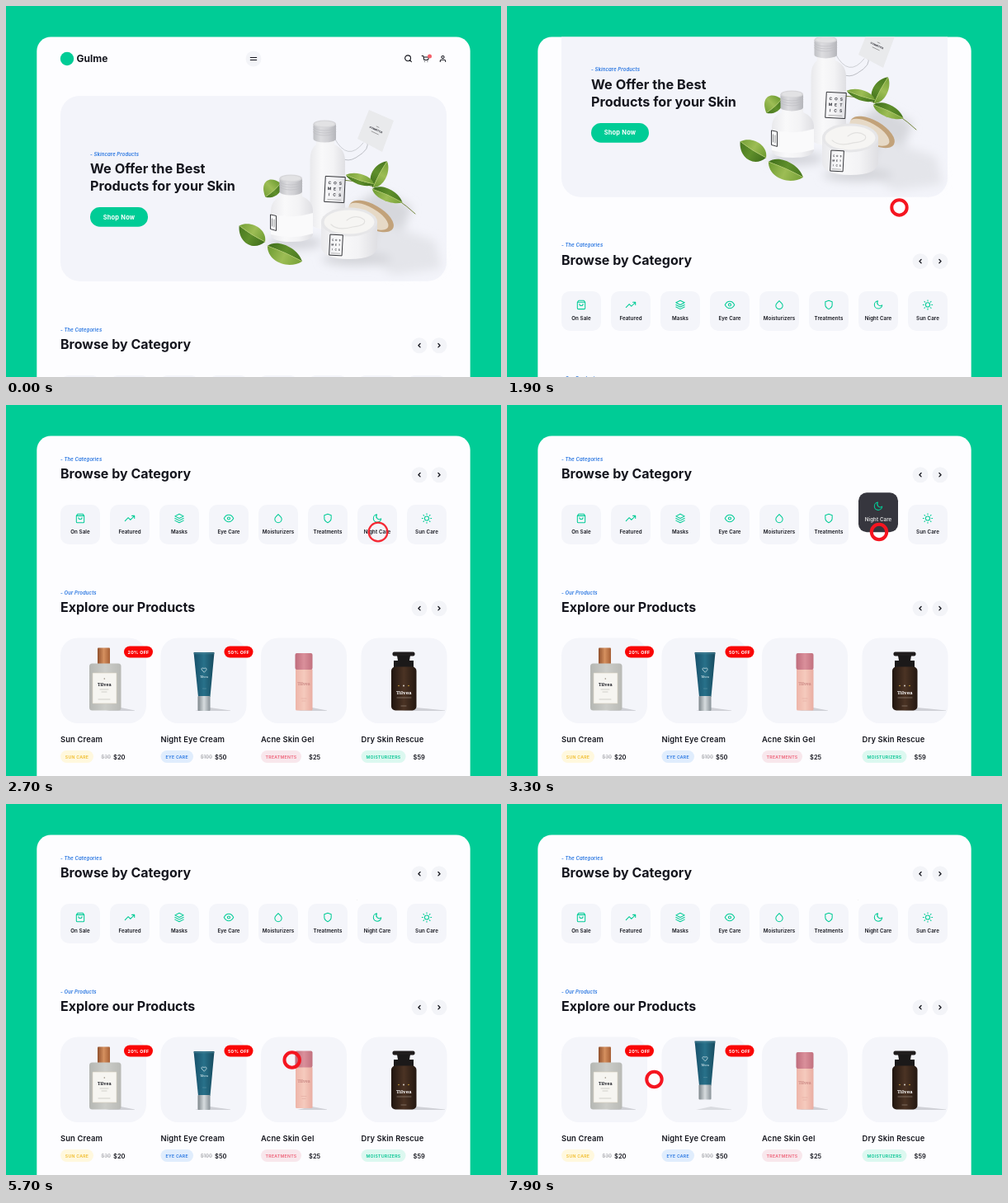
Recreate the animation shown at these times as an HTML page. Size 600 by 450 pixels, loop 8 s.

```html
<!DOCTYPE html>
<html lang="en">
<head>
<meta charset="utf-8">
<title>Skincare shop</title>
<style>
html, body { margin: 0; width: 100%; height: 100%; overflow: hidden; background: #00cc96; }
svg { display: block; width: 100vw; height: 100vh; }
text { font-family: Inter, "Open Sans", sans-serif; font-weight: 600; fill: #15161e; }
.bold { font-weight: 700; }
.mid { text-anchor: middle; }
.kicker { font-style: italic; fill: #2372e0; letter-spacing: .14px; }
.tag { text-anchor: middle; letter-spacing: .25px; }
.serif { font-family: "Noto Serif", "Liberation Serif", serif; font-weight: 700; }
.icon { fill: none; stroke: #00cc96; stroke-width: 2; stroke-linecap: round; stroke-linejoin: round; }
.dark { stroke: #15161e; stroke-width: 2.6; }
.arrow { stroke: #15161e; stroke-width: 3.6; }
</style>
</head>
<body>
<svg id="stage" viewBox="0 0 600 450"></svg>
<script>
const LOOP = 8000, STEP = 100, SCROLL = 327, LIFT = 27.5;
const BRAND = 'Gulme', LABEL = 'Tilvea';

// ---- drawing helpers ----
const text = (x, y, size, str, cls = '', extra = '') =>
  `<text x="${x}" y="${y}" font-size="${size}" class="${cls}" ${extra}>${str}</text>`;
const rect = (x, y, w, h, r, fill, extra = '') =>
  `<rect x="${x}" y="${y}" width="${w}" height="${h}" rx="${r}" fill="${fill}" ${extra}/>`;
const circle = (x, y, r, fill) => `<circle cx="${x}" cy="${y}" r="${r}" fill="${fill}"/>`;
const ellipse = (x, y, rx, ry, fill, extra = '') =>
  `<ellipse cx="${x}" cy="${y}" rx="${rx}" ry="${ry}" fill="${fill}" ${extra}/>`;
const path = (d, fill, extra = '') => `<path d="${d}" fill="${fill}" ${extra}/>`;
const line = (d, color, width) => path(d, 'none', `stroke="${color}" stroke-width="${width}" stroke-linecap="round"`);
const icon = (x, y, d, cls = '', scale = .52) =>
  `<path class="icon ${cls}" transform="translate(${x} ${y}) scale(${scale}) translate(-12 -12)" d="${d}"/>`;
const gradient = (id, ...colors) => `<linearGradient id="${id}">` + colors.map((c, i) =>
  `<stop offset="${i / (colors.length - 1)}" stop-color="${c}"/>`).join('') + '</linearGradient>';
// A leaf from its stem at (x, y); `upper` and `lower` are the bulges of its two halves.
const leaf = (x, y, length, upper, lower, angle) => {
  const half = (bulge, fill) =>
    path(`M0 0C${length * .15} ${bulge} ${length * .75} ${bulge} ${length} 0Q${length / 2} -2 0 0`, fill);
  return `<g transform="translate(${x} ${y}) rotate(${angle})">` + half(-upper, 'url(#leafDark)') +
    half(lower, 'url(#leafLight)') + line(`M0 0Q${length / 2} -2 ${length - 1} 0`, '#b5cc6d', .6) + '</g>';
};

const ICONS = {
  bag: 'M6 2 3 6v14a2 2 0 0 0 2 2h14a2 2 0 0 0 2-2V6l-3-4zM3 6h18M16 10a4 4 0 0 1-8 0',
  trend: 'M23 6 13.5 15.5 8.5 10.5 1 18M17 6h6v6',
  layers: 'M12 2 2 7l10 5 10-5zM2 17l10 5 10-5M2 12l10 5 10-5',
  eye: 'M1 12s4-8 11-8 11 8 11 8-4 8-11 8-11-8-11-8zM15 12a3 3 0 1 1-6 0 3 3 0 0 1 6 0',
  drop: 'M12 2.7l5.66 5.66a8 8 0 1 1-11.3 0z',
  shield: 'M12 22s8-4 8-10V5l-8-3-8 3v7c0 6 8 10 8 10z',
  moon: 'M21 12.8A9 9 0 1 1 11.2 3 7 7 0 0 0 21 12.8z',
  sun: 'M17 12a5 5 0 1 1-10 0 5 5 0 0 1 10 0M12 1v2M12 21v2M4.2 4.2l1.4 1.4M18.4 18.4l1.4 1.4M1 12h2M21 12h2M4.2 19.8l1.4-1.4M18.4 5.6l1.4-1.4',
  search: 'M19 11a8 8 0 1 1-16 0 8 8 0 0 1 16 0M21 21l-4.4-4.4',
  cart: 'M1 3h4l3 13h11l3-9H6M10 21h0M18 21h0',
  user: 'M20 21v-2a4 4 0 0 0-4-4H8a4 4 0 0 0-4 4v2M16 7a4 4 0 1 1-8 0 4 4 0 0 1 8 0'
};

const CATEGORIES = [['On Sale', 'bag'], ['Featured', 'trend'], ['Masks', 'layers'], ['Eye Care', 'eye'],
  ['Moisturizers', 'drop'], ['Treatments', 'shield'], ['Night Care', 'moon'], ['Sun Care', 'sun']];

const PRODUCTS = [
  { name: 'Sun Cream', tag: 'SUN CARE', width: 40, ink: '#f0bd2c', tint: '#fff8de', price: '$20', old: '$30', off: '20% OFF', draw: sunCream, foot: 139, shadow: 156 },
  { name: 'Night Eye Cream', tag: 'EYE CARE', width: 39.5, ink: '#2776e2', tint: '#e0edfd', price: '$50', old: '$100', off: '50% OFF', draw: eyeCream, foot: 247, shadow: 272 },
  { name: 'Acne Skin Gel', tag: 'TREATMENTS', width: 49, ink: '#ee6178', tint: '#f8e7ec', price: '$25', draw: skinGel, foot: 371, shadow: 389 },
  { name: 'Dry Skin Rescue', tag: 'MOISTURIZERS', width: 54, ink: '#00c491', tint: '#dcf8f0', price: '$59', draw: rescue, foot: 497, shadow: 532 }
];

// ---- products on the shelf ----
function sunCream() {
  return rect(111, 294.5, 15, 20, 1, 'url(#copper)') + rect(101, 313.5, 38.5, 57, 3.5, 'url(#stone)') +
    rect(105, 325, 29, 37, .5, '#f6f5f1', 'stroke="#d8d2c2" stroke-width=".6"') +
    text(119.3, 341, 5.3, LABEL, 'serif mid') + line('M114 345h10M116 348h6M112 357h14', '#aaa69c', .5) +
    circle(119.3, 332, .8, '#8f8778');
}
function eyeCream() {
  return path('M227.5 300H252.5L247.5 354H233Z', 'url(#teal)') + line('M228 301.5h24', '#4d8698', .8) +
    rect(232.5, 353, 15, 18, 1, 'url(#silver)') +
    line('M240 324l-3-3q-.5-3 3-1.5q3.5-1.5 3 1.5z', '#dcebee', .7) +
    text(240, 330.5, 3, LABEL, 'serif mid', 'style="fill:#cfe3e8"') + line('M238.5 344h4', '#6c9fae', .5);
}
function skinGel() {
  return rect(351, 320, 20.5, 50.5, 1.5, 'url(#blush)') + rect(350.5, 301, 21, 20, 2, 'url(#rose)') +
    text(361, 339.5, 4.8, LABEL, 'serif mid', 'style="fill:#c98581"') + line('M358 356h6M359 359h4', '#dda39a', .5);
}
function rescue() {
  return rect(468.5, 299.5, 27, 5, 2, '#201d1d') + path('M474 304h16l-1 6h5v9h-24v-9h5z', '#1b1919') +
    rect(467, 317.5, 30.5, 53, 5, 'url(#amber)') +
    text(482.3, 351, 6, LABEL, 'serif mid', 'style="fill:#fff"') +
    circle(476, 340.5, .8, '#d4a63a') + circle(482, 340.5, 1, '#d6d0c6') + circle(488, 340.5, .8, '#d4a63a') +
    line('M474 355h17M479 365h6', '#b1a59b', .5);
}

// ---- page parts ----
function arrows(y) {
  return [501, 525].map((x, i) => circle(x, y, 9.5, '#f3f4f8') +
    icon(x, y, i ? 'M9 18l6-6-6-6' : 'M15 18l-6-6 6-6', 'arrow', .36)).join('');
}
function heading(y, kicker, title) {
  return text(66, y, 5.9, '- ' + kicker, 'kicker') + text(66, y + 21.2, 16, title, 'bold') + arrows(y + 17.2);
}
function header() {
  return circle(74, 64, 8.2, '#00cc96') + text(85.5, 68, 12, BRAND, 'bold') +
    circle(300, 64, 9.5, '#f3f4f8') + line('M296.3 62.5h7.4M296.3 65.5h7.4', '#15161e', 1.1) +
    icon(487.5, 63.7, ICONS.search, 'dark', .43) + icon(508.5, 64, ICONS.cart, 'dark', .4) +
    circle(513.5, 61, 2.5, '#f4606a') + icon(529.5, 64, ICONS.user, 'dark', .4);
}
function cosmeticsLabel(x, y, width, height, angle) {
  const rows = ['COS', 'MET', 'ICS'].map((word, row) => [...word].map((letter, col) =>
    text((col - 1) * width * .27, (row - .85) * height * .23, width * .2, letter, 'mid')).join('')).join('');
  return `<g transform="translate(${x} ${y}) rotate(${angle})">` +
    rect(-width / 2, -height / 2, width, height, 0, 'none', 'stroke="#25262b" stroke-width=".9"') + rows +
    line(`M${-width * .33} ${height * .4}h${width * .66}`, '#777', .5) + '</g>';
}
function cap(x, y, width, height) {
  const rx = width / 2, ry = 4.5, mid = x + rx;
  const ridge = dy => line(`M${x} ${y + dy}A${rx} ${ry} 0 0 0 ${x + width} ${y + dy}`, '#bcbdc2', .6);
  return path(`M${x} ${y + ry}V${y + height - ry}A${rx} ${ry} 0 0 0 ${x + width} ${y + height - ry}V${y + ry}Z`, 'url(#cap)') +
    ellipse(mid, y + ry, rx, ry, '#d6d6d9') + ellipse(mid, y + ry, rx - 2, ry - 1.2, '#e2e2e4') +
    [8, 11, 14].map(ridge).join('');
}
function hero() {
  const shadows = '<g filter="url(#soft)">' + path('M395 262L452 222L492 244L470 300L410 300Z', '#d6d7dc') +
    path('M435 306L455 262L520 285L528 318L470 326Z', '#e4e5ea') + ellipse(350, 287, 34, 8, '#d3d4da') +
    ellipse(425, 307, 42, 8, '#d4d5da') + '</g>';
  const branch = line('M408 211Q455 214 496 252', '#75863d', 1) +
    leaf(445, 220, 36, 13, 11, -62) + leaf(446, 216, 36, 8, 9, -162) + leaf(444, 222, 40, 11, 9, 24);
  const tag = line('M395 165Q405 195 424 184T437 164', '#aeb0b6', .8) + line('M398 160Q414 190 433 166', '#c2c4c9', .8) +
    path('M440 126L470 139L456 177L426 161Z', '#e9eaec') +
    '<g transform="translate(448 151) rotate(25)">' + line('M-1 -5h3M-4 3h9', '#777', .6) +
    text(0, 0, 2.8, 'COSMETICS', 'mid bold') + '</g>';
  const tall = path('M376 160H398V168Q411 173 411 188V262Q411 271 391 271T368.5 262V188Q368.500 173 376 168Z', 'url(#white)') +
    cap(372.5, 138.5, 27.5, 27) + cosmeticsLabel(398.5, 222.5, 24, 31, 3);
  const small = path('M333 225H359V231Q372 236 372 249V276Q372 286 346 286T321 276V249Q321 236 333 231Z', 'url(#white)') +
    path('M321 252Q346 259 372 251V276Q346 284 321 277Z', '#fafafb') +
    cap(331.5, 204.5, 27.5, 25) +
    path('M320.5 253l7 1.5v18l-7-2z', 'none', 'stroke="#25262b" stroke-width=".9"') +
    line('M322.5 258v9M325 259v9', '#55565b', .7);
  const lid = '<g transform="rotate(30 443 255)">' + ellipse(443, 255, 30, 14, '#c2a27a') +
    ellipse(440, 257, 27, 11, '#e6d9c6') + '</g>';
  const jar = path('M382 262V291Q382 307 416 307T450 291V262Z', 'url(#white)') +
    ellipse(416, 262, 34, 17.5, '#e6e6e8') + ellipse(416, 262, 30.5, 14.5, '#f6f5f3') +
    line('M394 265Q402 273 420 268Q438 266 434 259Q424 252 413 260', '#e2e1df', 1.2) +
    cosmeticsLabel(400, 290, 15.5, 25, 3);
  return rect(66, 109, 468, 224.7, 23, '#f3f4fa') +
    text(102, 181.5, 5.9, '- Skincare Products', 'kicker') +
    text(102, 203.2, 16.3, 'We Offer the Best', 'bold') + text(102, 223.7, 16.2, 'Products for your Skin', 'bold') +
    rect(102, 244, 70, 23.7, 11.8, '#00cc96') +
    text(137, 258.5, 7.4, 'Shop Now', 'mid bold', 'style="fill:#fff" letter-spacing=".25"') +
    shadows + leaf(333, 215, 25, 10, 18, 138) + branch + tag + tall + lid + jar + small +
    leaf(314, 286, 37, 18, 14, -148) + leaf(317, 291, 46, 13, 17, 24);
}
function category([name, symbol], i) {
  const x = 66 + 60 * i;
  return `<g id="cat${i}">` + rect(x, 121, 48, 48, 10, '#f4f5fa') + icon(x + 24, 137.5, ICONS[symbol]) +
    text(x + 24, 156.2, 6.2, name, 'mid', 'letter-spacing=".08"') + '</g>';
}
function product(p, i) {
  const x = 66 + 121.5 * i, y = 429;
  const priceX = p.old ? x + (i ? 65.5 : 64) : x + p.width + 9;
  let out = rect(x, 282.5, 104, 103.5, 21, '#f4f5fa') +
    path(`M${p.foot - 18} 371L${p.foot} 367L${p.shadow} 370.5V371Z`, '#cfd0d6', `id="shadow${i}"`) +
    `<g id="item${i}">${p.draw()}</g>` +
    text(x, 409.4, 9.4, p.name, '', 'letter-spacing=".13"') +
    rect(x, 419, p.width, 15, 7.5, p.tint) +
    text(x + p.width / 2, y - .2, 5.2, p.tag, 'tag', `style="fill:${p.ink}"`) +
    text(priceX, y + .6, 7.5, p.price);
  if (p.old) out += text(priceX - 3, y, 6, p.old, '', 'text-anchor="end" style="fill:#b5b6bb" text-decoration="line-through"');
  if (p.off) out += rect(x + 77, 292.5, 35, 14, 7, '#fa0505') +
    text(x + 94.5, 301.5, 5.4, p.off, 'tag bold', 'style="fill:#fff"');
  return out;
}

const PANEL = 'x="37.3" y="37.5" width="525.4" height="440" rx="17"';
document.getElementById('stage').innerHTML = '<defs>' +
  gradient('copper', '#91502c', '#d5905f', '#a65f35') + gradient('stone', '#b5b7b3', '#cccdc9', '#b9bab6') +
  gradient('teal', '#17506a', '#28718a', '#164a5e') + gradient('silver', '#7d868b', '#d7dcdf', '#889197') +
  gradient('blush', '#eeb5a9', '#f5cabd', '#e9ada2') + gradient('rose', '#bf6c7c', '#da909b', '#c2717f') +
  gradient('amber', '#20150f', '#4b3324', '#241811') + gradient('white', '#e9e9ec', '#f9f9fa', '#f3f3f5', '#dfdfe3') +
  gradient('cap', '#bfc0c4', '#dcdcdf', '#cfcfd3', '#b4b5ba') +
  gradient('leafDark', '#3f6d1b', '#5f8f2b', '#47761f') + gradient('leafLight', '#6b9a30', '#9dbd55', '#75a037') +
  '<filter id="soft" x="-30%" y="-50%" width="160%" height="200%"><feGaussianBlur stdDeviation="6"/></filter>' +
  `<clipPath id="panel"><rect ${PANEL}/></clipPath></defs>` +
  rect(0, 0, 600, 450, 0, '#00cc96') + `<rect ${PANEL} fill="#fdfdff"/>` +
  '<g clip-path="url(#panel)"><g id="page">' + header() + hero() + `<g transform="translate(0 ${SCROLL})">` +
  heading(67.5, 'The Categories', 'Browse by Category') + CATEGORIES.map(category).join('') +
  heading(229.5, 'Our Products', 'Explore our Products') + PRODUCTS.map(product).join('') +
  '</g></g></g><circle id="ring" fill="none" stroke="#f51520"/>';

// ---- motion ----
const $ = id => document.getElementById(id);
const span = (t, a, b) => Math.min(1, Math.max(0, (t - a) / (b - a)));
const sine = p => Math.sin(p * Math.PI / 2) ** 2;
const quart = p => p < .5 ? 8 * p ** 4 : 1 - 8 * (1 - p) ** 4;
const easeOut = p => 1 - (1 - p) ** 3;
const mix = (a, b, k) => a + (b - a) * k;
const mixColor = (a, b, k) => `rgb(${a.map((v, i) => Math.round(mix(v, b[i], k)))})`;

const night = $('cat6'), nightCard = night.querySelector('rect'), nightText = night.querySelector('text');

function ringAt(t, scrolled) {
  if (t < 2300) {
    return { x: 475.5, y: 346.5 - Math.min(scrolled, 190), press: span(t, 1480, 1680) - span(t, 1980, 2130),
      show: t >= 1480 && t < 2130 };
  }
  const toShelf = sine(span(t, 5050, 5900)), along = sine(span(t, 7350, 8200));
  return { x: mix(mix(451, 331, toShelf), 120, along), y: mix(154, 334, toShelf),
    press: span(t, 2600, 2850), show: t >= 2600 };
}

function render(t) {
  const scrolled = SCROLL * quart(span(t, 1500, 2400));
  $('page').setAttribute('transform', `translate(0 ${-scrolled})`);

  const leave = span(t, 5200, 5650), enter = span(t, 2850, 3450);
  const tone = sine(enter) - sine(leave);
  night.setAttribute('transform', `translate(0 ${-15 * (easeOut(enter) - easeOut(leave))})`);
  nightCard.setAttribute('fill', mixColor([244, 245, 250], [21, 21, 30], tone));
  nightText.style.fill = mixColor([21, 22, 30], [255, 255, 255], tone);

  const raised = { 1: sine(span(t, 7600, 8240)), 2: sine(span(t, 5620, 6150)) - sine(span(t, 7450, 7880)) };
  for (const i in raised) {
    $('item' + i).setAttribute('transform', `translate(0 ${-LIFT * raised[i]})`);
    $('shadow' + i).setAttribute('opacity', 1 - .65 * raised[i]);
  }

  const ring = ringAt(t, scrolled), el = $('ring');
  el.setAttribute('cx', ring.x);
  el.setAttribute('cy', ring.y);
  el.setAttribute('r', mix(12.8, 9.2, ring.press));
  el.setAttribute('stroke-width', mix(1.1, 4, ring.press));
  el.setAttribute('opacity', mix(.85, 1, ring.press));
  el.setAttribute('visibility', ring.show ? 'visible' : 'hidden');
}

const start = performance.now();
function tick() {
  const t = (performance.now() - start) % LOOP;
  render(Math.floor(t / STEP) * STEP);
  requestAnimationFrame(tick);
}
tick();
</script>
</body>
</html>
```
